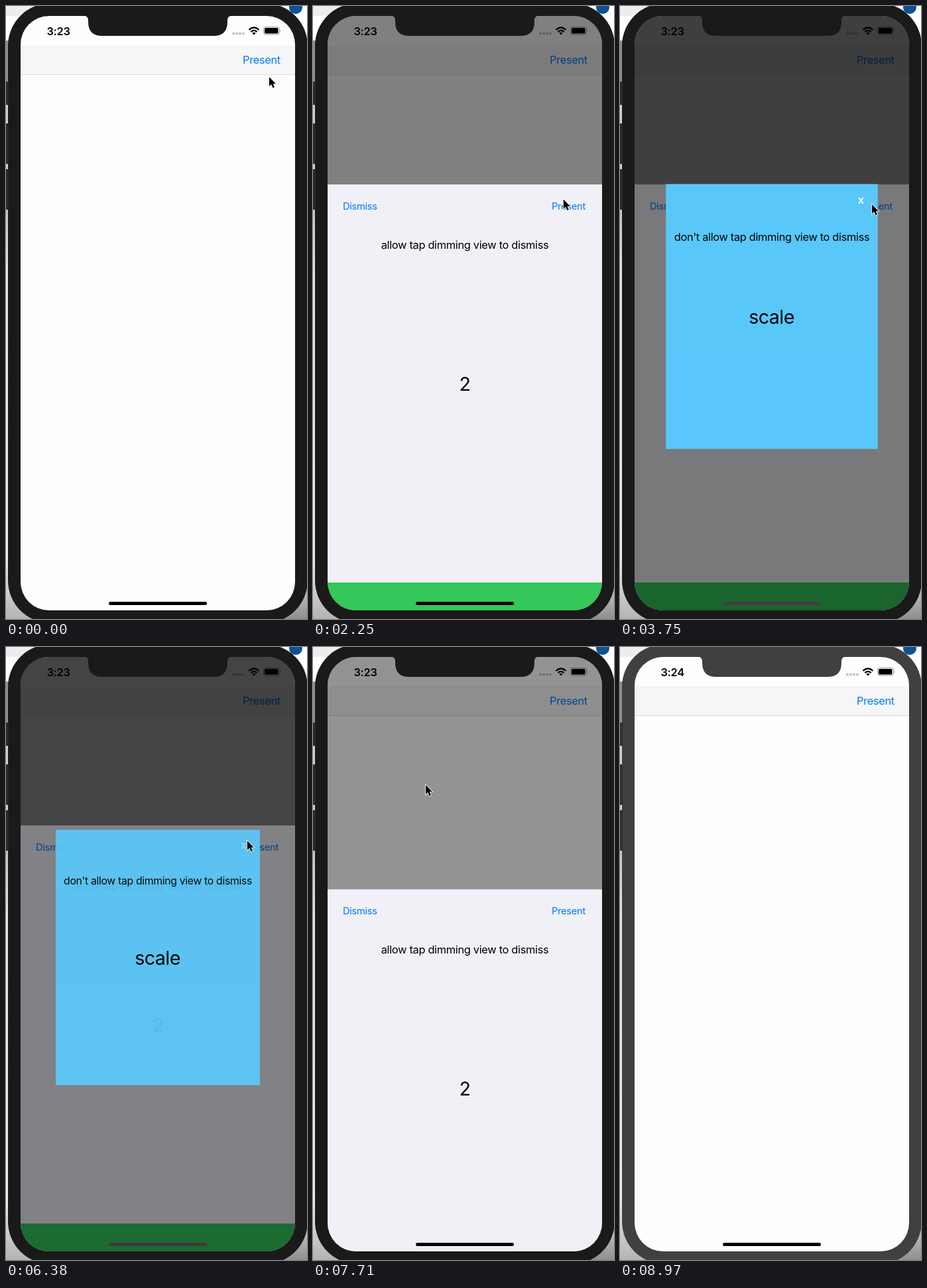
An HTML page that plays this animation: 454x924 px, repeating every 9.07 s.

```html
<!DOCTYPE html>
<html lang="en">
<head>
<meta charset="utf-8">
<title>Sheet and popup</title>
<style>
  html, body { margin: 0; width: 100%; height: 100%; overflow: hidden; background: #fff; }
  svg { display: block; width: 454px; height: 924px; }
  text { font: 400 16.4px Inter, "Open Sans", sans-serif; letter-spacing: -.02em; }
  .mid { text-anchor: middle; }
  .link { fill: #007aff; }
  .small { font-size: 14.7px; }
  .big { font-size: 28.7px; }
  .bold { font-weight: 600; }
</style>
</head>
<body>
<svg viewBox="0 0 454 924">
  <defs>
    <clipPath id="screen"><rect x="22" y="15" width="414" height="896" rx="43"/></clipPath>
    <linearGradient id="side" x2="0" y2="1">
      <stop offset="0" stop-color="#c4c4c4"/>
      <stop offset=".15" stop-color="#e4e4e4"/>
      <stop offset=".85" stop-color="#ececec"/>
      <stop offset="1" stop-color="#b4b4b4"/>
    </linearGradient>
    <linearGradient id="corner" x2="0" y2="1">
      <stop offset="0" stop-color="#d8d8d8"/>
      <stop offset="1" stop-color="#8e8e8e"/>
    </linearGradient>
  </defs>

  <!-- desktop behind the phone -->
  <rect width="50" height="15" fill="#eceeed"/>
  <rect y="52" width="4" height="62" fill="#8f8f8f"/>
  <rect y="114" width="4" height="193" fill="#cfcfcf"/>
  <rect y="307" width="60" height="617" fill="url(#side)"/>
  <rect x="394" y="860" width="60" height="64" fill="url(#corner)"/>
  <circle cx="437" cy="2" r="10" fill="#0b5394"/>

  <rect id="body" x="3" y="-4" width="452" height="934" rx="64"/>
  <g id="keys">
    <rect y="114" width="4" height="35"/>
    <rect y="177" width="4" height="61"/>
    <rect y="246" width="4" height="61"/>
  </g>

  <g clip-path="url(#screen)">
    <rect x="22" y="15" width="414" height="896" fill="#fefefe"/>
    <rect x="22" y="59" width="414" height="44" fill="#f6f5f7"/>
    <rect x="22" y="103" width="414" height="1" fill="#dcdcdd"/>
    <text class="link" x="357" y="87">Present</text>
    <rect id="dim" x="22" y="15" width="414" height="896"/>

    <g id="sheet">
      <rect x="22" width="414" height="600" fill="#f1f0f6"/>
      <rect x="22" y="600" width="414" height="60" fill="#34c759"/>
      <text class="link small" x="45" y="37.5">Dismiss</text>
      <text class="link small" id="more" x="360" y="37.5">Present</text>
      <text class="mid" x="229" y="96.5">allow tap dimming view to dismiss</text>
      <text class="mid big" x="229" y="311">2</text>
    </g>

    <rect id="dim2" x="22" y="15" width="414" height="896"/>
    <g id="popup">
      <rect x="-160" y="-200" width="320" height="400" fill="#5ac8fa"/>
      <text class="mid bold" id="close" x="134.5" y="-170" fill="#fff">x</text>
      <text class="mid" y="-114">don't allow tap dimming view to dismiss</text>
    </g>
    <text class="mid big" id="label" x="228.5" y="479">scale</text>
    <rect id="home" x="155" y="898" width="148" height="5" rx="2.5"/>
  </g>

  <path id="notch" d="M116 14Q124 15 124 21V24Q124 45 145 45H313Q334 45 334 24V21Q334 15 342 14Z"/>

  <!-- status bar -->
  <text class="bold" id="clock" x="61.5" y="43.5">3:23</text>
  <g fill-opacity=".24">
    <circle cx="343" cy="41.5" r="2"/><circle cx="348" cy="41.5" r="2"/>
    <circle cx="353" cy="41.5" r="2"/><circle cx="358" cy="41.5" r="2"/>
  </g>
  <g fill="none" stroke="#000" stroke-width="2.3">
    <path d="M366.5 36Q374 29 381.500 36"/>
    <path d="M369.300 39Q374 34.800 378.700 39"/>
  </g>
  <path d="M371.300 40.700Q374 38.600 376.700 40.700L374 43.500Z"/>
  <rect x="388.500" y="31.500" width="24" height="11.500" rx="3" fill="none" stroke="#000" stroke-opacity=".4"/>
  <rect x="390" y="33" width="20.500" height="8.500" rx="1.600"/>
  <path d="M413.500 35.500Q415.200 37.200 413.500 39Z" fill-opacity=".45"/>

  <path id="cursor" d="M0 0V14L3.200 11.100L5.500 16.400L8 15.300L5.700 10.200H10Z" stroke="#fff" stroke-width="1.600" paint-order="stroke"/>
</svg>

<script>
const LOOP = 9070;
const $ = id => document.getElementById(id);
const set = (id, name, value) => $(id).setAttribute(name, value);

// runs of picture changes: first time, last time, steps
const runs = [
  [0, 2550, 18], [3150, 3750, 5], [4200, 4350, 2], [5040, 5040, 1],
  [5340, 5790, 4], [6230, 7270, 8], [7710, 8650, 7], [8800, 8970, 2]
];

// pointer stops: time, x, y
const stops = [
  [0, 397, 107], [650, 380, 85], [1350, 380, 85], [2100, 377, 289],
  [2550, 380, 299], [4050, 380, 299], [4350, 318, 196], [4890, 318, 196],
  [5040, 317, 195], [5190, 317, 195], [5790, 364, 292], [6700, 364, 292],
  [7270, 170, 208], [8050, 170, 208], [8650, 186, 912], [8800, 188, 960]
];

function hold(t) {
  const [a, b, n] = runs.filter(r => r[0] <= t).pop();
  if (n === 1 || t >= b) return b;
  const gap = (b - a) / (n - 1);
  return a + Math.floor((t - a) / gap) * gap;
}

// critically damped spring from 0 to 1
function spring(ms) {
  const x = Math.max(0, ms) * 0.0122;
  return 1 - (1 + x) * Math.exp(-x);
}

function pointer(t) {
  const i = stops.findIndex(s => s[0] > t);
  if (i < 0) return stops[stops.length - 1].slice(1);
  const [t0, x0, y0] = stops[i - 1], [t1, x1, y1] = stops[i];
  const u = (t - t0) / (t1 - t0), e = u * u * (3 - 2 * u);
  return [x0 + (x1 - x0) * e, y0 + (y1 - y0) * e];
}

function draw(t) {
  const sheet = spring(t - 961) - spring(t - 7654);
  const leaving = t > 6300;
  const pop = spring(t - 3128) - spring(t - 6341.6);
  const small = leaving ? 0.5 : 0.6;
  const shown = pop > 0.01;

  set('dim', 'opacity', sheet / 2);
  set('sheet', 'transform', `translate(0 ${911 - 642 * sheet})`);
  set('more', 'opacity', t >= 3150 && t < 3450 ? 0.6 : 1);

  set('dim2', 'opacity', pop / 2);
  set('popup', 'opacity', shown ? pop : 0);
  set('popup', 'transform', `translate(229 468) scale(${small + (1 - small) * pop})`);
  set('close', 'opacity', t >= 6230 ? 0.45 : 1);
  set('label', 'opacity', shown ? 1 : 0);
  set('home', 'fill', `rgb(${67 * pop},${62 * pop},${68 * pop})`);

  const idle = t >= 8800;
  const shell = idle ? '#404040' : '#1a1a1a';
  set('body', 'fill', shell);
  set('notch', 'fill', shell);
  set('keys', 'fill', idle ? '#303030' : '#2a2a2a');
  $('clock').textContent = t >= 8800 ? '3:24' : '3:23';

  const [x, y] = pointer(t);
  set('cursor', 'transform', `translate(${x} ${y})`);
}

const start = performance.now();
function tick() {
  draw(hold((performance.now() - start) % LOOP));
  requestAnimationFrame(tick);
}
tick();
</script>
</body>
</html>
```
